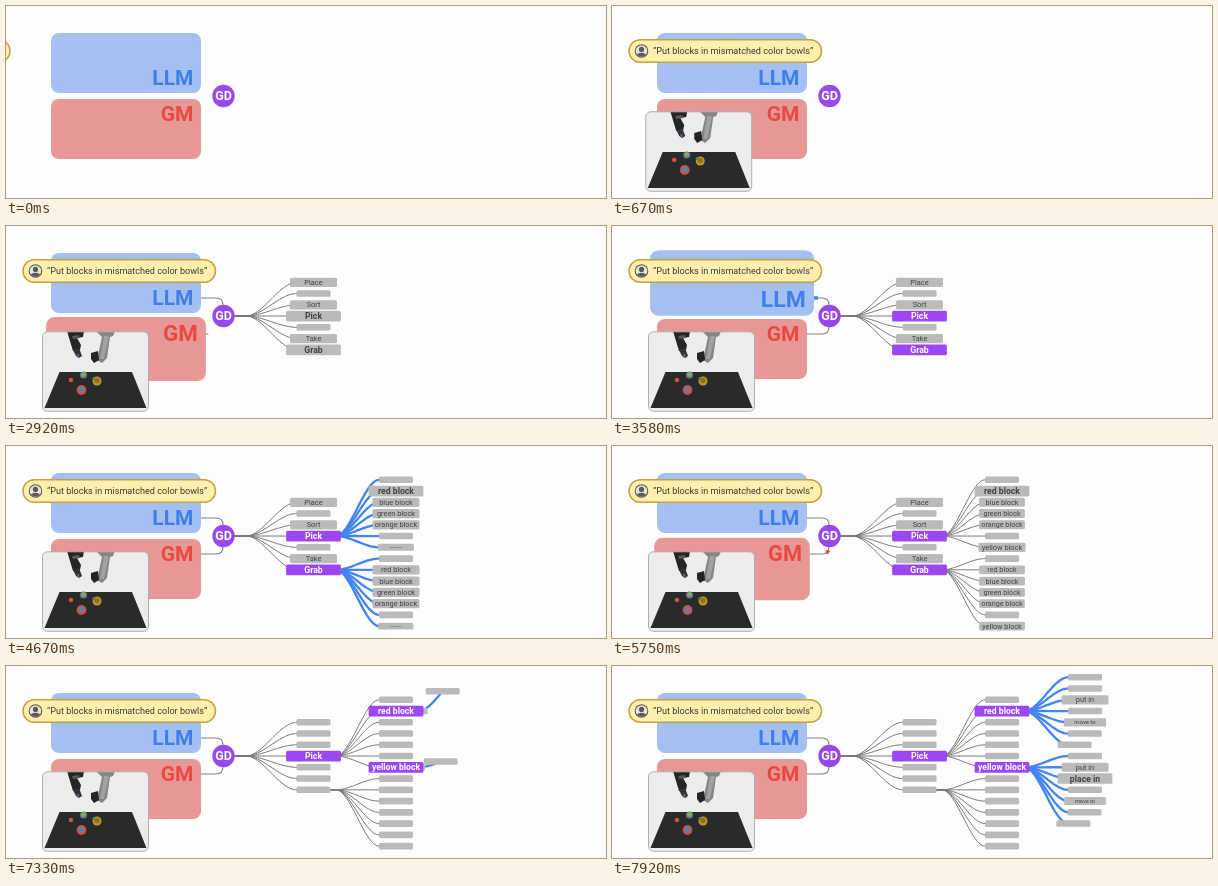
These frames come from a looping animation (600 by 192 pixels, 8 s). An HTML page with a canvas:

```html
<!DOCTYPE html>
<html lang="en">
<head>
<meta charset="utf-8">
<title>Grounded decoding</title>
<style>
html, body { margin: 0; width: 100%; height: 100%; overflow: hidden; background: #fdfdfd; }
canvas { display: block; width: 600px; height: 192px; }
</style>
</head>
<body>
<canvas id="stage"></canvas>
<script>
const LOOP = 8000, W = 600, H = 192;
const ROW = 11.25, STAGGER = 83, TRAVEL = 310;
const BLUE = [66, 133, 240], RED = [232, 74, 64], GRAY = [120, 120, 120];
const PURPLE = [155, 71, 243], CHIP = [186, 186, 186];
const INK = [66, 66, 66], WHITE = [255, 255, 255];

const canvas = document.getElementById('stage');
const ctx = canvas.getContext('2d');
const ratio = window.devicePixelRatio || 1;
canvas.width = W * ratio;
canvas.height = H * ratio;

const clamp = v => Math.max(0, Math.min(1, v));
const span = (t, start, length) => clamp((t - start) / length);
const smooth = u => u * u * (3 - 2 * u);
const hump = u => Math.sin(Math.PI * u);
const lerp = (a, b, u) => a + (b - a) * u;
const rgb = c => `rgb(${c.map(Math.round).join()})`;
const mix = (a, b, u) => rgb(a.map((v, i) => lerp(v, b[i], u)));

// A fan of seven chips. Each word: [text, size, picked at, dropped at]
const fans = [
  { px: 217.5, py: 90, x: 307.5, top: 56.3, start: 1447, calm: 2420, words: {
    0: ['Place', 1, 0, 6170], 2: ['Sort', 1, 0, 6170], 3: ['Pick', 1.6, 3120],
    5: ['Take', 1, 0, 6170], 6: ['Grab', 1.6, 3120, 6170] } },
  { px: 307.5, py: 90, x: 390, top: 33.8, start: 3870, calm: 4870, words: {
    1: ['red block', 1.6, 6170], 2: ['blue block', 1, 0, 5700], 3: ['green block', 1, 0, 5700],
    4: ['orange block', 1, 0, 5700], 6: ['yellow block', 1, 6170] } },
  { px: 307.5, py: 123.8, x: 390, top: 112.6, start: 3878, calm: 4870, words: {
    1: ['red block', 1, 0, 5700], 2: ['blue block', 1, 0, 5700], 3: ['green block', 1, 0, 5700],
    4: ['orange block', 1, 0, 5700], 6: ['yellow block', 1, 0, 5700] } },
  { px: 390, py: 45, x: 473, top: 11.3, start: 7213, calm: 9000, words: {
    2: ['put in', 1], 4: ['move to', 1] } },
  { px: 390, py: 101.3, x: 473, top: 90, start: 7219, calm: 9000, words: {
    1: ['put in', 1], 2: ['place in', 1.6], 4: ['move to', 1] } }
];

function box(x, y, w, h, r, fill, stroke, line = 1) {
  ctx.beginPath();
  ctx.roundRect(x, y, w, h, r);
  if (fill) { ctx.fillStyle = fill; ctx.fill(); }
  if (stroke) { ctx.strokeStyle = stroke; ctx.lineWidth = line; ctx.stroke(); }
}

function poly(fill, ...p) {
  ctx.beginPath();
  for (let i = 0; i < p.length; i += 2) ctx.lineTo(p[i], p[i + 1]);
  ctx.fillStyle = fill;
  ctx.fill();
}

function disc(x, y, r, fill) {
  ctx.beginPath();
  ctx.arc(x, y, r, 0, 7);
  ctx.fillStyle = fill;
  ctx.fill();
}

function label(text, x, y, size, weight, fill, align = 'center') {
  ctx.font = `${weight} ${size}px Roboto, sans-serif`;
  ctx.textAlign = align;
  ctx.fillStyle = fill;
  ctx.fillText(text, x, y);
}

// Straight out of the parent, an S-bend, then straight into the chip
function pathPoint(fan, i, u) {
  const x = lerp(fan.px, fan.x, u);
  const from = fan.px + 22.5, to = fan.x - 17;
  return [x, lerp(fan.py, fan.top + i * ROW, smooth(span(x, from, to - from)))];
}

const travelled = (fan, i, t) =>
  Math.sin(span(t, fan.start + i * STAGGER, TRAVEL) * Math.PI / 2);

function drawBranch(fan, i, t) {
  const u = travelled(fan, i, t);
  if (!u) return;
  const calm = span(t, fan.calm, 250);
  ctx.beginPath();
  for (let k = 0; k <= 40; k++) ctx.lineTo(...pathPoint(fan, i, u * k / 40));
  ctx.strokeStyle = mix(BLUE, GRAY, calm);
  ctx.lineWidth = lerp(2.3, 1, calm);
  ctx.stroke();
}

function drawChip(fan, i, t) {
  const age = t - fan.start - i * STAGGER;
  if (age <= 0) return;
  const [x, y] = pathPoint(fan, i, travelled(fan, i, t));
  const [text, size, pick, drop] = fan.words[i] || ['', 0];
  let grow = size * span(age, 280, 150 * size || 1);
  let picked = 0, pop = 1;
  if (pick) {
    const u = span(t, pick, 280);
    picked = smooth(u);
    grow = lerp(grow, 1.6, picked);
    pop += 0.18 * hump(u);
  }
  if (drop) {
    const left = 1 - smooth(span(t, drop, 270));
    grow *= left;
    picked *= left;
  }
  const w = (34 + 13 * grow) * pop, h = w * 0.195;
  box(x - w / 2, y - h / 2, w, h, 1.5, mix(CHIP, PURPLE, picked));
  if (grow > 0.03) {
    const font = w * 0.158 * Math.min(1, 0.25 + grow);
    label(text, x, y + font * 0.35, font, grow > 1.05 ? 'bold' : 'normal', mix(INK, WHITE, picked));
  }
}

// Connector from a model to the decoder; dir is +1 from above, -1 from below
function wire(y, dir, grown, signals, color, t) {
  if (!grown) return;
  const len = 26;
  const trace = () => {
    ctx.beginPath();
    ctx.moveTo(195, y);
    ctx.lineTo(210, y);
    ctx.quadraticCurveTo(217, y, 217, y + 7 * dir);
    ctx.stroke();
  };
  ctx.strokeStyle = '#858585';
  ctx.lineWidth = 1.1;
  ctx.setLineDash([len * grown, 99]);
  trace();
  for (const start of signals) {
    const at = (t - start) * 0.06;
    if (at <= 0 || at > len) continue;
    ctx.strokeStyle = rgb(color);
    ctx.lineWidth = 3.5;
    ctx.setLineDash([4, 99]);
    ctx.lineDashOffset = 2 - at;
    trace();
    ctx.lineDashOffset = 0;
  }
  ctx.setLineDash([]);
}

function model(name, top, base, fill, ink, pulses, t) {
  const scale = 1 + 0.1 * Math.max(...pulses.map(p => hump(span(t, p, 400))));
  ctx.save();
  ctx.translate(120, top + 30);
  ctx.scale(scale, scale);
  box(-75, -30, 150, 60, 8, fill);
  label(name, 67.5, base - top - 30, 21, 'bold', ink, 'right');
  ctx.restore();
}

function prompt(dx) {
  ctx.save();
  ctx.translate(dx, 0);
  box(17, 33.7, 192.5, 22.6, 11.3, '#ffefac', '#c4a23e', 1.5);
  disc(29.5, 45, 6.8, '#555');
  disc(29.5, 45, 5.8, '#e9e4d2');
  ctx.save();
  ctx.beginPath();
  ctx.arc(29.5, 45, 5.8, 0, 7);
  ctx.clip();
  disc(29.5, 43.4, 2.6, '#5b5b5b');
  ctx.beginPath();
  ctx.ellipse(29.5, 50.2, 5, 3.4, 0, 0, 7);
  ctx.fill();
  ctx.restore();
  label('“Put blocks in mismatched color bowls”', 41, 48.3, 9.1, 'normal', '#3a3a3a', 'left');
  ctx.restore();
}

function bowl(x, y, r, rim, inside) {
  disc(x, y, r, rim);
  disc(x, y - 0.4, r * 0.62, inside);
}

function scene(dx) {
  ctx.save();
  ctx.translate(dx, 0);
  box(36.5, 105.8, 106, 79.5, 5, '#ececec');
  ctx.save();
  ctx.clip();
  poly('#292a2b', 53.5, 146, 126, 146, 140.5, 182, 38.5, 182);
  poly('#252525', 61, 105, 78, 105, 77, 111, 71, 112, 75, 119, 74, 124, 67, 125, 64, 115);
  poly('#55585c', 66, 110, 73, 109, 74, 112, 67, 113);
  poly('#333', 67, 124, 73, 122, 76, 130, 73, 132, 70, 130);
  poly('#53699b', 71, 128, 73, 128, 73.5, 132, 72, 132);
  poly('#858585', 90, 105, 109, 105, 107, 110, 104, 111, 101, 132, 96, 137, 91, 134, 96, 111);
  poly('#a1a1a1', 98, 110, 103, 110, 98, 133, 94, 133);
  poly('#242424', 85, 127, 92, 125, 93, 134, 88, 137, 85, 133);
  bowl(65, 154, 2.3, '#c94a3c', '#d85a48');
  bowl(77.5, 149, 3.6, '#64788a', '#80ad62');
  bowl(91, 155, 4.5, '#c39a24', '#8f7420');
  bowl(75.5, 164, 4.9, '#d24c40', '#637fa4');
  disc(88, 152.5, 1.6, '#4f8a4a');
  ctx.restore();
  box(36.5, 105.8, 106, 79.5, 5, null, '#adadad');
  ctx.restore();
}

function draw(t) {
  ctx.setTransform(ratio, 0, 0, ratio, 0, 0);
  ctx.fillStyle = '#fdfdfd';
  ctx.fillRect(0, 0, W, H);

  wire(72, 1, span(t, 1200, 250), [3430, 6400], BLUE, t);
  wire(108, -1, span(t, 2850, 250), [5400], RED, t);
  model('LLM', 27, 79.3, '#a4c0f2', '#407eec', [1170, 3430, 6400], t);
  model('GM', 93, 115.3, '#e89797', '#e84a40', [2830, 5400], t);

  for (const fan of [...fans].reverse()) {
    for (let i = 0; i < 7; i++) drawBranch(fan, i, t);
    for (let i = 6; i >= 0; i--) drawChip(fan, i, t);
  }
  disc(217.5, 90, 11.2, rgb([152, 73, 236]));
  label('GD', 217.5, 94.4, 12.5, 'bold', '#fff');

  prompt(-206.5 * (1 - span(t, 0, 580)) ** 3);
  scene(-150 * (1 - span(t, 200, 640)) ** 3);
}

function tick(now) {
  draw(now % LOOP);
  requestAnimationFrame(tick);
}
draw(0);
requestAnimationFrame(tick);
</script>
</body>
</html>
```
